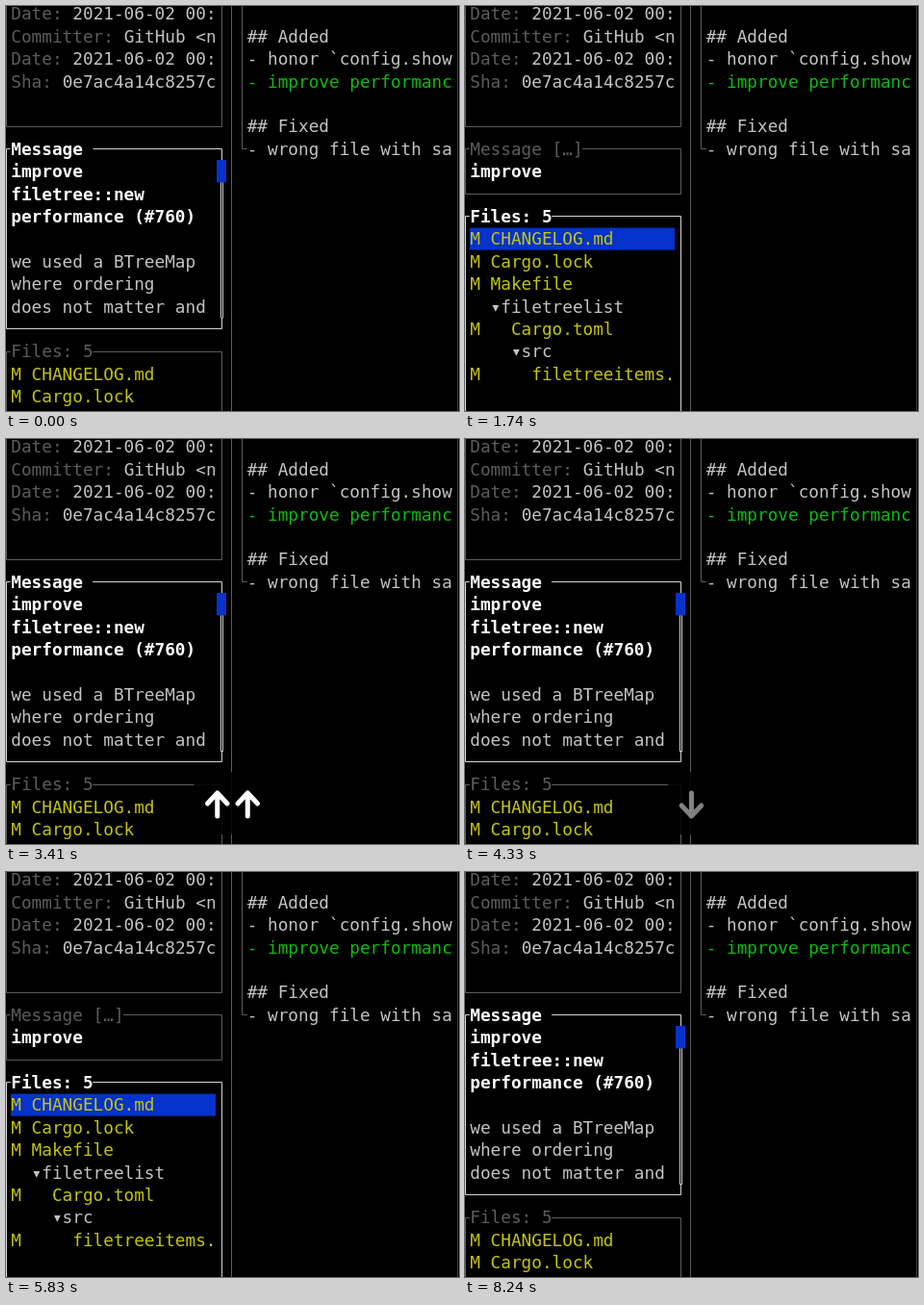
These frames come from a looping animation (471x421 px, 8340 ms). An HTML page with a canvas:

```html
<!DOCTYPE html>
<html lang="en">
<head>
<meta charset="utf-8">
<title>Terminal commit view</title>
<style>
  html, body { margin: 0; width: 100%; height: 100%; overflow: hidden; background: #000; }
  canvas { display: block; }
</style>
</head>
<body>
<canvas id="stage" width="471" height="421"></canvas>
<script>
const g = document.getElementById('stage').getContext('2d');
const LOOP = 8340, STEP = 83.33;
const CW = 10.67, RH = 23.41;
const DIM = '#5c5c5c', LIGHT = '#c3c3c3', WHITE = '#fff', EDGE = '#d4d4d4';
const GREEN = '#0bbd0b', YELLOW = '#c4c40c', BLUE = '#0632cc';

const message = ['improve', 'filetree::new', 'performance (#760)', '',
  'we used a BTreeMap', 'where ordering', 'does not matter and',
  'HashMap performs', 'much better'];
const info = [['Date:', '2021-06-02 00:'], ['Committer:', 'GitHub <n'],
  ['Date:', '2021-06-02 00:'], ['Sha:', '0e7ac4a14c8257c']];
const files = ['M CHANGELOG.md', 'M Cargo.lock', 'M Makefile', '  ▾filetreelist',
  'M   Cargo.toml', '    ▾src', 'M     filetreeitems.'];

// [step, view, value]: message scroll offset or selected file
const views = [[0, 'msg', 0], [7, 'msg', 1], [9, 'msg', 2], [14, 'files', 0],
  [26, 'files', 1], [28, 'files', 0], [33, 'msg', 2], [39, 'msg', 1], [41, 'msg', 0],
  [53, 'msg', 1], [56, 'msg', 2], [62, 'files', 0], [81, 'msg', 2],
  [88, 'msg', 1], [92, 'msg', 0]];

// [step, arrows, opacity at first]; an empty entry fades the previous one out
const presses = [[0, ''], [6, '↓', .5], [8, '↓↓', 1], [13, '↓', .06], [19, ''],
  [25, '↓', .5], [27, '↓↑', 1], [32, '↑', .6], [38, '↑', .6], [40, '↑↑', 1], [46, ''],
  [52, '↓', .5], [55, '↓', .7], [61, '↓', .65], [68, ''],
  [80, '↑', .4], [86, '↑', .9], [90, '↑', .7], [97, '']];

const colX = c => 5.3 + c * CW;
const rowY = r => 8 + r * RH;

function text(s, col, row, color, bold) {
  g.font = (bold ? 'bold ' : '') + '17.72px "DejaVu Sans Mono", "Noto Sans Mono", monospace';
  g.fillStyle = color;
  g.fillText(s, colX(col), rowY(row) + 6.3);
}

function line(color, ...pts) {
  g.strokeStyle = color;
  g.lineWidth = 1;
  g.beginPath();
  pts.forEach(([x, y]) => g.lineTo(Math.floor(x) + .5, Math.floor(y) + .5));
  g.stroke();
}

function panel(top, bottom, title, gap, focused) {
  const color = focused ? EDGE : DIM, y0 = rowY(top), y1 = rowY(bottom);
  line(color, [4, y0], [0, y0], [0, y1], [224, y1], [224, y0], [colX(gap), y0]);
  text(title, 0, top, focused ? WHITE : DIM, focused);
}

function diffPane() {
  line(DIM, [234, -1], [234, 421]);
  line('#404040', [469, -1], [469, 421]);
  line(DIM, [245, -1], [245, rowY(6)], [250, rowY(6)]);
  text('## Added', 23, 1, LIGHT);
  text('- honor `config.show', 23, 2, LIGHT);
  text('- improve performanc', 23, 3, GREEN);
  text('## Fixed', 23, 5, LIGHT);
  text('- wrong file with sa', 23, 6, LIGHT);
}

function infoPane() {
  line(DIM, [0, -1], [0, rowY(5)], [224, rowY(5)], [224, -1]);
  info.forEach(([label, value], r) => {
    text(label, 0, r, DIM);
    text(value, label.length + 1, r, LIGHT);
  });
}

function messagePane(scroll) {
  panel(6, 14, 'Message', 8, true);
  message.slice(scroll, scroll + 7).forEach((s, i) => {
    const head = i + scroll < 3;
    text(s, 0, 7 + i, head ? WHITE : LIGHT, head);
  });
  g.fillStyle = '#000';
  g.fillRect(221, 160, 7, 164);
  line(EDGE, [223, 160], [223, 324]);
  line(EDGE, [225, 160], [225, 324]);
  g.fillStyle = BLUE;
  g.fillRect(219, 160 + scroll * 70.3, 10, 23.4);
}

function fileRow(s, row) {
  text(s, 0, row, s.includes('▾') ? LIGHT : YELLOW);
}

function filesPane(selected) {
  panel(6, 8, 'Message […]', 11, false);
  text('improve', 0, 7, WHITE, true);
  panel(9, 19, 'Files: 5', 8, true);
  g.fillStyle = BLUE;
  g.fillRect(5, rowY(10 + selected) - 11.5, 213, 23);
  files.forEach((s, i) => fileRow(s, 10 + i));
}

function arrow(x, up) {
  const d = up ? 1 : -1, tip = 380 - 12 * d;
  g.beginPath();
  g.moveTo(x, tip + 24 * d);
  g.lineTo(x, tip);
  g.moveTo(x - 10.3, tip + 11 * d);
  g.lineTo(x, tip);
  g.lineTo(x + 10.3, tip + 11 * d);
  g.strokeStyle = WHITE;
  g.lineWidth = 5;
  g.lineCap = g.lineJoin = 'round';
  g.stroke();
}

function keyOverlay(step) {
  const i = presses.findLastIndex(p => p[0] <= step);
  const [start, shown, first] = presses[i];
  if (!shown && i === 0) return;
  const keys = shown || presses[i - 1][1];
  const alpha = shown ? Math.min(1, first + (step - start) / 2)
                      : Math.max(0, (2 - step + start) / 3);
  if (!alpha) return;
  const half = 8.5 + 15.75 * keys.length;
  g.globalAlpha = shown ? .87 : .87 * alpha;
  g.fillStyle = '#000';
  g.beginPath();
  g.roundRect(235.5 - half, 346, 2 * half, 65, 8);
  g.fill();
  g.globalAlpha = alpha;
  [...keys].forEach((k, n) => arrow(235.5 + 31.5 * (n - (keys.length - 1) / 2), k === '↑'));
  g.globalAlpha = 1;
}

function draw(ms) {
  const step = Math.floor((ms % LOOP + 12) / STEP);
  const [, view, value] = views.findLast(v => v[0] <= step);
  g.fillStyle = '#000';
  g.fillRect(0, 0, 471, 421);
  diffPane();
  infoPane();
  if (view === 'msg') {
    messagePane(value);
    panel(15, 19, 'Files: 5', 8, false);
    files.slice(0, 2).forEach((s, i) => fileRow(s, 16 + i));
  } else {
    filesPane(value);
  }
  keyOverlay(step);
}

const begin = performance.now();
function tick() {
  draw(performance.now() - begin);
  requestAnimationFrame(tick);
}
tick();
</script>
</body>
</html>
```
